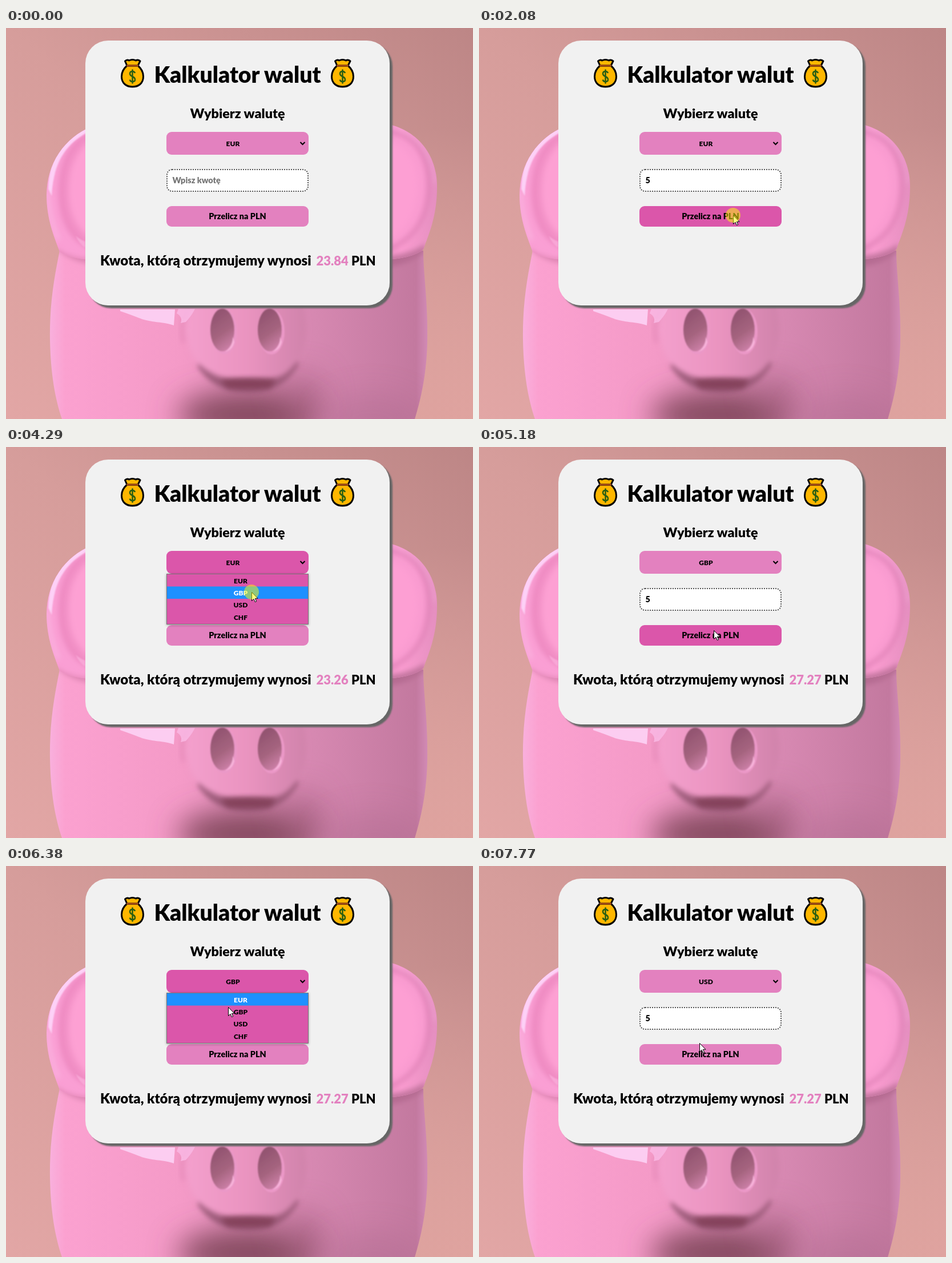
Recreate the animation shown at these times as an HTML page. Size 818 by 685 pixels, loop 8000 ms.

```html
<!DOCTYPE html>
<html lang="pl">
<head>
<meta charset="utf-8">
<title>Kalkulator walut</title>
<style>
  html, body { margin: 0; width: 100%; height: 100%; overflow: hidden; }
  svg { position: absolute; left: 0; top: 0; width: 818px; height: 685px; }
  text { font: 900 14.4px Lato, sans-serif; }
  .mid { text-anchor: middle; }
  .title { font-size: 39.2px; }
  .head { font-size: 23.4px; }
  .result { font-size: 24px; }
  .result tspan { font-size: 22px; }
  .small { font-size: 12px; }
  .pink { fill: #e381bf; }
  .pink.dark { fill: #db56aa; }
  .smooth { filter: url(#smooth); }
  .soft { filter: url(#soft); }
  .softer { filter: url(#softer); }
</style>
</head>
<body>
<svg viewBox="0 0 818 685">
  <defs>
    <filter id="smooth" x="-20%" y="-20%" width="140%" height="140%"><feGaussianBlur stdDeviation="1.2"/></filter>
    <filter id="soft" x="-50%" y="-50%" width="200%" height="200%"><feGaussianBlur stdDeviation="5"/></filter>
    <filter id="softer" x="-80%" y="-150%" width="260%" height="400%"><feGaussianBlur stdDeviation="26"/></filter>
    <linearGradient id="wall" x1="0" y1="1" x2="1" y2="0">
      <stop offset="0" stop-color="#e2a6a5"/><stop offset=".5" stop-color="#d69d9b"/><stop offset="1" stop-color="#bd8686"/>
    </linearGradient>
    <radialGradient id="floor" cx="1" cy="1" r=".75">
      <stop offset="0" stop-color="#dfa39f"/><stop offset="1" stop-color="#dfa39f" stop-opacity="0"/>
    </radialGradient>
    <linearGradient id="skin">
      <stop offset="0" stop-color="#f9b0dd"/><stop offset=".04" stop-color="#fba1d0"/><stop offset=".35" stop-color="#f49ac7"/>
      <stop offset=".7" stop-color="#d688b1"/><stop offset=".97" stop-color="#c3799f"/><stop offset="1" stop-color="#d18ab5"/>
    </linearGradient>
    <linearGradient id="snout">
      <stop offset="0" stop-color="#f4a0cd"/><stop offset=".5" stop-color="#ea94c0"/><stop offset="1" stop-color="#d083ab"/>
    </linearGradient>
    <linearGradient id="nostril" x1=".2" y1="0" x2=".6" y2="1">
      <stop offset="0" stop-color="#8e506d"/><stop offset=".6" stop-color="#a5647f"/><stop offset="1" stop-color="#cb7fa6"/>
    </linearGradient>
    <linearGradient id="earR">
      <stop offset="0" stop-color="#ea8cc2"/><stop offset=".5" stop-color="#fa9cd0"/><stop offset="1" stop-color="#e58fc0"/>
    </linearGradient>
    <path id="body" d="M94 390C86 430 76 480 77 545C78 605 86 650 98 685H716C730 640 739 590 738 530C738 470 731 430 731 390Z"/>
    <path id="earLeft" d="M180 165C130 170 72 215 71 292C71 335 84 365 94 392Q115 405 150 406H190Z"/>
    <path id="earRight" d="M640 165C700 165 755 205 755 278C755 330 741 360 731 388Q712 404 660 406H630Z"/>
    <clipPath id="inBody"><use href="#body"/></clipPath>
    <clipPath id="inLeft"><use href="#earLeft"/></clipPath>
    <clipPath id="inRight"><use href="#earRight"/></clipPath>
  </defs>
  <rect width="818" height="685" fill="url(#wall)"/>
  <rect width="818" height="685" fill="url(#floor)"/>

  <use href="#body" fill="url(#skin)"/>
  <g clip-path="url(#inBody)">
    <path class="soft" d="M88 385Q115 412 160 414V385Z" fill="#dd84b2"/>
    <path class="soft" d="M738 385Q712 418 650 420V385Z" fill="#b56c92"/>
    <ellipse class="softer" cx="425" cy="678" rx="125" ry="42" fill="#84495f"/>
    <ellipse class="softer" cx="520" cy="640" rx="40" ry="40" fill="#a96485" opacity=".6"/>
    <ellipse class="softer" cx="640" cy="690" rx="90" ry="50" fill="#ae6a8e" opacity=".45"/>
    <path class="soft" d="M335 592Q365 640 425 640Q485 640 513 588L480 560H370Z" fill="#9d5b7a"/>
    <path class="soft" d="M316 480C308 538 322 582 352 600Q372 613 390 614H465Q486 612 502 594C528 568 532 530 520 480Z" fill="url(#snout)"/>
    <path class="soft" d="M374 617Q425 612 474 617L462 631Q425 635 388 631Z" fill="#85425b"/>
    <path class="soft" d="M322 490Q302 515 311 552" fill="none" stroke="#e287b7" stroke-width="5"/>
    <path d="M200 493H296L294 521C275 514 255 517 233 508Q215 501 200 496Z" fill="#fccdf1"/>
    <path d="M302 492H331Q326 503 315 515L306 517Q310 506 299 500Z" fill="#fabbe6" opacity=".8"/>
    <g id="hole" class="smooth">
      <ellipse cx="382" cy="532" rx="23" ry="40" fill="#eb98c7"/>
      <ellipse cx="379" cy="529" rx="21" ry="37.500" fill="url(#nostril)"/>
      <path d="M397 541Q398 558 384 567Q397 564 400 550Z" fill="#f8b5dc"/>
    </g>
    <use href="#hole" x="83"/>
  </g>

  <use href="#earLeft" fill="#fa9fd4"/>
  <g clip-path="url(#inLeft)">
    <path class="soft" d="M160 181C110 195 94 240 95 292C97 335 110 372 160 390Z" fill="#f290c6" stroke="#ea83bb" stroke-width="5"/>
    <path class="soft" d="M150 195C118 220 108 250 110 296Q114 350 155 372Z" fill="#fda0d3"/>
    <path class="smooth" d="M148 168C105 184 75 225 74 282L80 294C83 240 100 204 148 180Z" fill="#fdd1f7"/>
    <path class="soft" d="M73 285Q74 330 92 371" fill="none" stroke="#fbbfe6" stroke-width="4"/>
    <path class="soft" d="M88 386Q112 404 150 404V412H88Z" fill="#e489b8"/>
    <path class="smooth" d="M139 374Q130 371 122 364Q128 378 139 385Z" fill="#fbb0dd" opacity=".7"/>
  </g>
  <use href="#earRight" fill="url(#earR)"/>
  <g clip-path="url(#inRight)">
    <path class="soft" d="M670 181C718 187 741 227 740 279C738 333 714 370 670 388Z" fill="#f99bd0" stroke="#d879af" stroke-width="5"/>
    <path class="soft" d="M665 198C707 205 722 238 722 279C719 327 700 359 665 376Z" fill="#fd9fd3"/>
    <path class="soft" d="M655 402Q708 397 735 378V412H655Z" fill="#c3769f"/>
    <path class="soft" d="M676 173Q746 194 752 272" fill="none" stroke="#f3a6d6" stroke-width="3"/>
  </g>
</svg>

<svg viewBox="0 0 818 685">
  <defs>
    <filter id="shadow" x="-10%" y="-10%" width="120%" height="120%"><feDropShadow dx="5" dy="5" stdDeviation="1.3" flood-color="#666"/></filter>
    <filter id="popShadow" x="-10%" y="-20%" width="120%" height="140%"><feDropShadow dx="0" dy="1" stdDeviation="2" flood-opacity=".35"/></filter>
    <g id="bag">
      <path d="M212 66C206 71 202.500 77 202.500 85C202.500 97 211 103 221.500 103C232 103 240.500 97 240.500 85C240.500 77 237 71 231 66Z" fill="#ffb700" stroke="#000" stroke-width="3"/>
      <path d="M212 66L208.500 58Q212 54.500 215.500 57Q221.500 54 227.500 57Q231 54.500 235 58L231 66Z" fill="#ffb700" stroke="#000" stroke-width="3" stroke-linejoin="round"/>
      <path d="M211 66H232" stroke="#a34a16" stroke-width="3"/>
      <path d="M226 79Q225 76 221.500 76Q217 76 217 80Q217 83 221.500 85Q226 87 226 90.500Q226 94 221.500 94Q217.500 94 217 90.500M221.500 72.500V97.500" fill="none" stroke="#285e12" stroke-width="2.500"/>
    </g>
  </defs>
  <rect x="139" y="22" width="533" height="464" rx="40" fill="#f1f1f1" filter="url(#shadow)"/>
  <use href="#bag"/><use href="#bag" x="368"/>
  <text class="mid title" x="405.5" y="96">Kalkulator walut</text>
  <text class="mid head" x="405.5" y="158">Wybierz walutę</text>

  <rect id="select" class="pink" x="281" y="182" width="249" height="40" rx="9"/>
  <rect id="selectRing" x="281" y="182" width="249" height="40" rx="9" fill="none" stroke="#000" stroke-width="2"/>
  <text id="currency" class="mid small" x="397.5" y="207"></text>
  <path d="M515.500 200L519.500 204L523.500 200" fill="none" stroke="#000" stroke-width="2"/>

  <rect id="input" x="282" y="248" width="247" height="38" rx="9" fill="#fff" stroke-width="2"/>
  <text id="entry" x="291.5" y="271.5"></text>
  <rect id="caret" y="258" width="1" height="19"/>
  <g id="spinner">
    <rect x="506" y="259" width="13" height="17" fill="#efefef"/>
    <path d="M509 265.500L512.500 261.500L516 265.500ZM509 269.500L512.500 273.500L516 269.500Z" fill="#444"/>
  </g>

  <rect id="button" class="pink" x="281" y="312" width="249" height="36" rx="9"/>
  <text class="mid" x="405.5" y="335">Przelicz na PLN</text>
  <text id="result" class="result" x="165" y="416">Kwota, którą otrzymujemy wynosi <tspan id="amount" class="pink" x="543.5"></tspan><tspan> PLN</tspan></text>

  <g id="popup">
    <rect x="281.5" y="222.5" width="248" height="88" fill="#db56aa" stroke="#777" filter="url(#popShadow)"/>
    <rect id="highlight" x="282" width="247" height="21.5" fill="#1e90ff"/>
  </g>
  <g id="arrow">
    <path d="M.5 .5V15.500L4 12.200L6.300 17.500L8.700 16.500L6.400 11.300H11Z" fill="#fff" stroke="#000"/>
  </g>
  <path id="beam" d="M-3 -7H-1L0 -6L1 -7H3M0 -6V6M-3 7H-1L0 6L1 7H3" fill="none" stroke="#333"/>
  <circle id="click" r="13" fill="#ff0" fill-opacity=".5"/>
</svg>

<script>
const LOOP = 8000, HOVER_LAG = 60, ROW = 21.4;
const CURRENCIES = ['EUR', 'GBP', 'USD', 'CHF'];
const $ = id => document.getElementById(id);
const show = (id, on) => $(id).style.display = on ? '' : 'none';
const between = (t, a, b) => t >= a && t < b;
const place = (id, p) => $(id).setAttribute('transform', `translate(${p.x} ${p.y})`);

// start, end, steps, target x, target y
const moves = [
  [260, 990, 12, 452, 272], [1660, 1860, 4, 445, 328],
  [2930, 3275, 6, 440, 218], [3350, 3420, 2, 440, 212],
  [3620, 3690, 2, 436, 225], [3760, 3760, 1, 434, 243],
  [3960, 4090, 2, 430, 254], [4630, 4960, 6, 411, 321],
  [5640, 5980, 6, 390, 201], [6250, 6570, 6, 388, 268],
  [6720, 6780, 2, 388, 270], [7110, 7570, 8, 386, 310]
];
const clicks = [1120, 2080, 3490, 4290, 5110, 6120, 7040, 7710];

function pointer(t) {
  let x = 621, y = 679;
  for (const [start, end, steps, toX, toY] of moves) {
    if (t < start) break;
    const interval = (end - start) / (steps - 1) || 1;
    const p = Math.min(1, (Math.floor((t - start) / interval + 1e-6) + 1) / steps);
    const ease = 1 - (1 - p) ** 1.7;
    x += (toX - x) * ease;
    y += (toY - y) * ease;
  }
  return { x: Math.round(x), y: Math.round(y) };
}

const rows = CURRENCIES.map((name, i) => {
  const label = document.createElementNS('http://www.w3.org/2000/svg', 'text');
  label.setAttribute('class', 'mid small');
  label.setAttribute('x', 411);
  label.setAttribute('y', 238.5 + i * ROW);
  label.textContent = name;
  $('popup').append(label);
  return label;
});

function draw(t) {
  const pos = pointer(t), felt = pointer(t - HOVER_LAG);
  const open = between(t, 3560, 4360) || between(t, 6185, 7110);
  const over = (top, bottom) => t > 260 && !open &&
    between(felt.x, 281, 530) && between(felt.y, top, bottom);
  const focused = between(t, 1120, 2080), typed = t >= 1320;
  const chosen = t < 4360 ? 0 : t < 7110 ? 1 : 2;

  $('select').classList.toggle('dark', open || over(182, 222));
  $('button').classList.toggle('dark', over(312, 348));
  show('selectRing', between(t, 4360, 5110) || between(t, 7110, 7710));
  $('currency').textContent = CURRENCIES[chosen];

  $('input').setAttribute('stroke', focused ? '#000' : '#555');
  $('input').setAttribute('stroke-dasharray', focused ? 'none' : '2 2');
  $('entry').textContent = typed ? '5' : 'Wpisz kwotę';
  $('entry').setAttribute('fill', typed ? '#000' : '#757575');
  show('caret', focused);
  $('caret').setAttribute('x', typed ? 300 : 291);
  show('spinner', focused || over(247, 287));

  show('result', !between(t, 1320, 2150));
  $('amount').textContent = t < 1320 ? '23.84' : t < 5180 ? '23.26' : '27.27';

  show('popup', open);
  const row = felt.y < 223 ? chosen : Math.min(3, Math.floor((felt.y - 223) / ROW));
  $('highlight').setAttribute('y', 223 + row * ROW);
  rows.forEach((label, i) => label.setAttribute('fill', i === row ? '#fff' : '#000'));

  const beam = !open && between(pos.x, 281, 530) && between(pos.y, 247, 287);
  show('arrow', t >= 260 && !beam);
  show('beam', t >= 260 && beam);
  place('arrow', pos);
  place('beam', pos);
  place('click', pos);
  show('click', clicks.some(c => between(t, c, c + 60)));
}

function frame() {
  draw(performance.now() % LOOP);
  requestAnimationFrame(frame);
}
frame();
</script>
</body>
</html>
```
